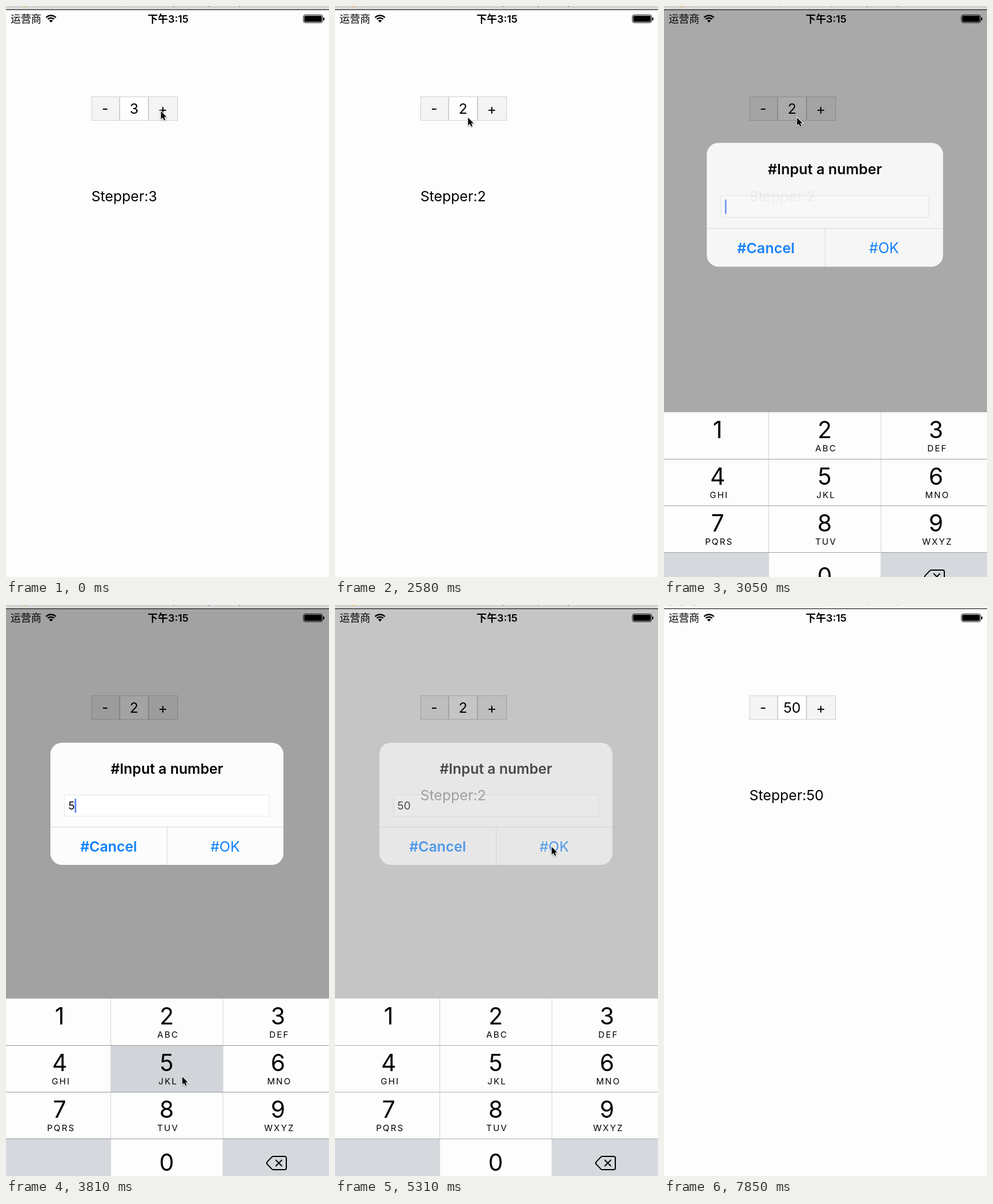
An HTML page with a canvas that plays this animation: 560x991 px, repeating every 7950 ms.

```html
<!DOCTYPE html>
<html lang="zh-CN">
<head>
<meta charset="utf-8">
<title>Stepper</title>
<style>
html, body { margin: 0; width: 100%; height: 100%; overflow: hidden; background: #fdfdfd; }
canvas { display: block; }
</style>
</head>
<body>
<canvas id="stage" width="560" height="991"></canvas>
<script>
const W = 560, H = 991, LOOP = 7950, TICK = LOOP / 90;
const screen2d = document.getElementById('stage').getContext('2d');
const layer = Object.assign(document.createElement('canvas'), { width: W, height: H });
const layer2d = layer.getContext('2d');
let g = screen2d;

const FONT = 'Inter, "Noto Sans CJK SC", "Noto Sans CJK", sans-serif';
const BODY = 24.6;
const BLUE = '#0a80ff';

// User actions, in ms
const PLUS = [60, 340, 690];
const MINUS = [1220, 1490, 1660, 1840];
const PRESSES = [{ key: 5, at: 3610 }, { key: 0, at: 4230 }];
const CONFIRM = 5261;

const MOVES = [
  { from: 620, to: 1060, x: 170, y: 182 },
  { from: 1970, to: 2560, x: 230, y: 193 },
  { from: 3100, to: 3530, x: 305, y: 818 },
  { from: 3890, to: 4062, x: 300, y: 965 },
  { from: 4420, to: 5123, x: 375, y: 419 },
  { from: 5660, to: 5918, x: 377, y: 432 },
  { from: 6520, to: 6800, x: 352, y: 450 },
  { from: 7070, to: 7420, x: 445, y: 1000 }
];

const LETTERS = ['', 'ABC', 'DEF', 'GHI', 'JKL', 'MNO', 'PQRS', 'TUV', 'WXYZ'];
const KEY_X = [93, 278.5, 471.5];
const KEY_EDGE = [0, 182, 376, W];
const KEY_H = 81;

const clamp = v => Math.max(0, Math.min(1, v));
const ease = (t, start, dur) => 1 - Math.pow(1 - clamp((t - start) / dur), 2.4);
const mix = (a, b, p) => a + (b - a) * p;
const passed = (times, t) => times.filter(at => at <= t).length;

// The screen refreshes in even ticks, slightly ahead of the clock
const snap = t => Math.floor((t + 26) / TICK) * TICK;

function countAt(t) {
  return t > CONFIRM + 200 ? 50 : 3 + passed(PLUS, t) - passed(MINUS, t);
}

function pointerAt(t) {
  let x = 268, y = 182;
  for (const move of MOVES) {
    const p = ease(t, move.from, move.to - move.from);
    x = mix(x, move.x, p);
    y = mix(y, move.y, p);
  }
  return [x, y];
}

function rect(x, y, w, h, color) {
  g.fillStyle = color;
  g.fillRect(x, y, w, h);
}

function round(x, y, w, h, r, color) {
  g.fillStyle = color;
  g.beginPath();
  g.roundRect(x, y, w, h, r);
  g.fill();
}

function text(s, x, y, size, { weight = 400, align = 'center', color = '#000', spacing = 0 } = {}) {
  g.font = `${weight} ${size}px ${FONT}`;
  g.letterSpacing = spacing + 'px';
  g.textAlign = align;
  g.fillStyle = color;
  g.fillText(s, x, y);
}

function drawStepper(count) {
  rect(148, 157, 150, 42, '#d0d0d0');
  rect(149, 158, 47, 40, '#f4f4f4');
  rect(198, 158, 48, 40, '#fefefe');
  rect(248, 158, 49, 40, '#f4f4f4');
  text('-', 172, 187, BODY);
  text(count, 222, 187, BODY);
  text('+', 272, 188, BODY);
  text('Stepper:' + count, 148, 339, BODY, { align: 'left' });
}

function drawAlert(t, scale) {
  g.clearRect(0, 0, W, H);
  g.save();
  g.translate(279, 345);
  g.scale(scale, scale);
  g.translate(-279, -345);
  round(77, 239, 404, 212, 20, '#fcfcfc');
  text('#Input a number', 279, 293, BODY, { weight: 600 });
  rect(101, 329, 356, 38, '#e6e6e6');
  rect(102, 330, 354, 36, '#fff');
  rect(77, 385, 404, 1, '#dcdcdc');
  rect(279, 386, 1, 65, '#dcdcdc');
  text('#Cancel', 178, 427.5, BODY, { weight: 600, color: BLUE });
  text('#OK', 380, 427.5, BODY, { color: BLUE });

  const typed = PRESSES.filter(press => t >= press.at + 80);
  text(typed.map(press => press.key).join(''), 108, 355, 19, { align: 'left' });
  if (t < CONFIRM) {
    const since = t - (typed.length ? typed[typed.length - 1].at + 80 : 2827);
    g.globalAlpha = clamp(0.5 + 0.8 * Math.cos(since * Math.PI / 500));
    round(108 + typed.length * 11, 336, 2.8, 24.5, 1, '#5b86f3');
  }
  g.restore();
}

function drawBackspace(x, y) {
  const corners = [[-7, -11.5], [17, -11.5], [17, 11.5], [-7, 11.5], [-18, 0]];
  g.strokeStyle = '#000';
  g.lineWidth = 2;
  g.lineJoin = g.lineCap = 'round';
  g.beginPath();
  g.moveTo(x + 5, y - 11.5);
  corners.forEach(([dx, dy], i) => {
    const [nx, ny] = corners[(i + 1) % corners.length];
    if (i) g.arcTo(x + dx, y + dy, x + nx, y + ny, 3);
  });
  g.arcTo(x - 7, y - 11.5, x + 5, y - 11.5, 3);
  g.closePath();
  for (const side of [-1, 1]) {
    g.moveTo(x + 4 - 5, y - 5 * side);
    g.lineTo(x + 4 + 5, y + 5 * side);
  }
  g.stroke();
}

function drawKeyboard(top, held, shade) {
  const line = mix(220, 150, shade);
  const fillKey = (col, row, color) =>
    rect(KEY_EDGE[col], top + row * KEY_H, KEY_EDGE[col + 1] - KEY_EDGE[col], KEY_H + 1, color);

  rect(0, top, W, H, '#fdfdfd');
  fillKey(0, 3, '#d5d8dd');
  fillKey(2, 3, '#d5d8dd');
  if (held === 5) fillKey(1, 1, '#d1d5da');
  if (held === 0) fillKey(1, 3, '#d1d5da');
  for (const x of [181, 375.5]) rect(x, top, 1.2, H, '#d9d9db');
  for (let row = 1; row < 4; row++) rect(0, top + row * KEY_H, W, 1, `rgb(${line},${line},${line})`);

  LETTERS.forEach((letters, i) => {
    const x = KEY_X[i % 3], y = top + Math.floor(i / 3) * KEY_H;
    text(i + 1, x, y + 45, 40.5);
    text(letters, x + 2.5, y + 67.5, 15, { spacing: 2.1 });
  });
  text(0, KEY_X[1], top + 299, 40.5);
  drawBackspace(469, top + 285.5);
}

function drawStatus() {
  text('运营商', 8, 28.5, 17.8, { align: 'left' });
  text('下午3:15', 281, 28.5, 17.8, { weight: 600 });

  const wave = r => {
    g.beginPath();
    g.arc(78, 28.5, r, -Math.PI * 0.75, -Math.PI * 0.25);
  };
  g.strokeStyle = g.fillStyle = '#000';
  g.lineCap = 'butt';
  g.lineWidth = 2.5;
  for (const r of [12, 7.8]) {
    wave(r);
    g.stroke();
  }
  wave(4.6);
  g.lineTo(78, 28.8);
  g.fill();

  g.lineWidth = 1;
  g.beginPath();
  g.roundRect(515.5, 15.5, 33.5, 13.5, 3.5);
  g.stroke();
  round(517, 17, 30.5, 10.5, 2, '#000');
  round(550, 20, 2, 5, 1, '#000');
}

function drawTitleBar(active) {
  rect(0, 0, W, 6, active ? '#d5d5d5' : '#f5f5f5');
  const lights = active ? ['#cbbfbd', '#f0b43c', '#bdcaba'] : Array(3).fill('#cfcfcf');
  lights.forEach((color, i) => {
    g.fillStyle = color;
    g.beginPath();
    g.arc(12 + i * 20, -7, 8.2, 0, Math.PI * 2);
    g.fill();
  });
  if (active) rect(199, 0, 4, 1, '#e5b060');
  for (const x of [290, 351, 404]) rect(x, 0, 2, 1, active ? '#5a5f9c' : '#b0b0b0');
  rect(0, 6, W, 1, '#000');
}

function drawPointer(x, y) {
  const points = [[0, 0], [0, 13.6], [3.1, 10.8], [5.3, 15.6], [7.6, 14.6], [5.4, 9.9], [9.6, 9.9]];
  g.save();
  g.translate(x + 0.7, y + 0.7);
  g.beginPath();
  points.forEach(p => g.lineTo(...p));
  g.closePath();
  g.lineJoin = 'miter';
  g.lineWidth = 2;
  g.strokeStyle = '#fff';
  g.shadowColor = 'rgba(0,0,0,.35)';
  g.shadowBlur = 2;
  g.shadowOffsetY = 1;
  g.stroke();
  g.shadowColor = 'transparent';
  g.fillStyle = '#000';
  g.fill();
  g.restore();
}

function draw(t) {
  const shown = ease(t, 2736, 400);
  const fade = shown * (1 - ease(t, CONFIRM, 220));
  const lift = shown * (1 - ease(t, 6174, 290));

  rect(0, 0, W, H, '#fdfdfd');
  drawStepper(countAt(t));

  if (fade > 0.005) {
    rect(0, 7, W, H, `rgba(0,0,0,${0.36 * fade})`);
    g = layer2d;
    drawAlert(t, 1 + 0.2 * (1 - shown));
    g = screen2d;
    g.globalAlpha = fade;
    g.drawImage(layer, 0, 0);
    g.globalAlpha = 1;
  }
  if (lift > 0.005) {
    const held = PRESSES.find(press => t >= press.at && t < press.at + 250);
    drawKeyboard(Math.round(683 + 315 * (1 - lift)), held && held.key, fade * lift);
  }
  drawStatus();
  drawTitleBar(t < 7850);
  drawPointer(...pointerAt(t));
}

const start = performance.now();
function tick() {
  draw(snap((performance.now() - start) % LOOP) % LOOP);
  requestAnimationFrame(tick);
}
tick();
</script>
</body>
</html>
```
